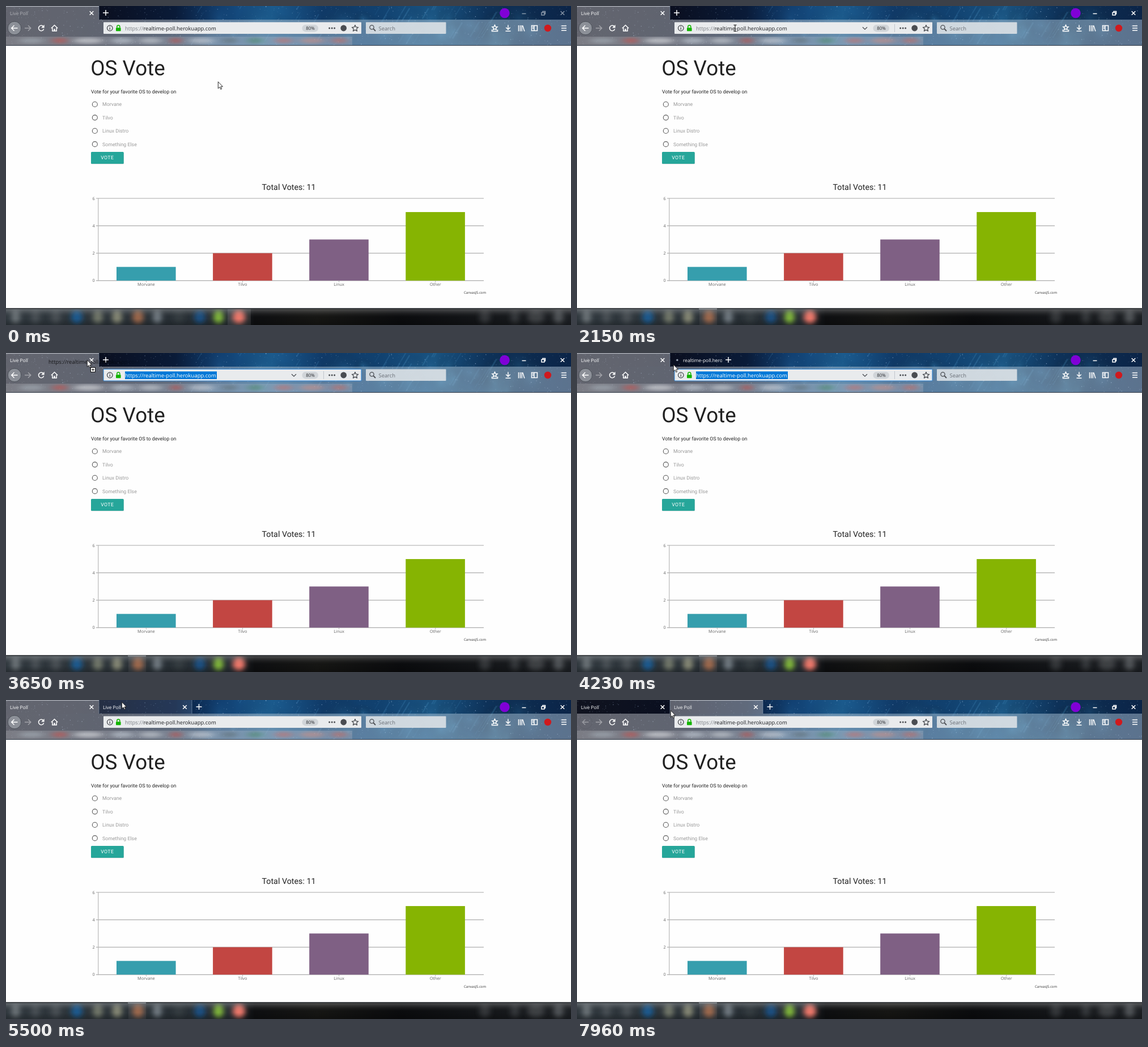
Write an HTML page with a canvas that moves like this. It is 997 px wide and 562 px high and loops after 8000 ms.

```html
<!DOCTYPE html>
<html lang="en">
<head>
<meta charset="utf-8">
<title>Live Poll</title>
<style>
html, body { margin: 0; width: 100%; height: 100%; overflow: hidden; background: #fefefe; }
canvas, svg { position: absolute; left: 0; top: 0; display: block; }
text { font-family: "Open Sans", sans-serif; text-rendering: geometricPrecision; white-space: pre; }
.page text { font-family: Roboto, sans-serif; font-size: 8.8px; }
.page .opt { fill: #9a9a9a; }
.chart text { font-family: "Open Sans", sans-serif; font-size: 7.4px; fill: #666; text-anchor: middle; }
.url { font-size: 9.5px; }
.tab { font-size: 8.4px; fill: #fff; }
.line { fill: none; stroke: #fff; stroke-width: 1.5; }
.dark { fill: none; stroke: #4a4d52; stroke-width: 1.3; }

/* one loop is 8 s, so 1% is 80 ms */
.sw { animation: 8s step-end infinite; }
.first { animation-name: first; }
.second { animation-name: second; }
.focus { animation-name: focus; }
.idle { animation-name: idle; }
.front { animation-name: front; }
.hoverbar { animation-name: hoverbar; }
.selected { animation-name: selected; }
.plain { animation-name: plain; }
.newtab { animation-name: newtab; }
.loading { animation-name: loading; }
.loaded { animation-name: loaded; }
.hovertab { animation-name: hovertab; }
.arrow { animation-name: arrow; }
.beam { animation-name: beam; }
.badge { animation-name: badge; }
.ghost { animation-name: ghost; }
@keyframes first { 0% { opacity: 1 } 92.25%, 100% { opacity: 0 } }
@keyframes second { 0% { opacity: 0 } 92.25%, 100% { opacity: 1 } }
@keyframes focus { 0% { opacity: .5 } 26.875%, 100% { opacity: 1 } }
@keyframes idle { 0% { opacity: 1 } 26.875%, 100% { opacity: 0 } }
@keyframes front { 0% { opacity: 0 } 26.875%, 100% { opacity: 1 } }
@keyframes hoverbar { 0% { opacity: 0 } 7% { opacity: 1 } 62.5%, 100% { opacity: 0 } }
@keyframes selected { 0% { opacity: 0 } 28% { opacity: 1 } 62.5%, 100% { opacity: 0 } }
@keyframes plain { 0% { opacity: 1 } 28% { opacity: 0 } 62.5%, 100% { opacity: 1 } }
@keyframes newtab { 0% { opacity: 0 } 51.875%, 100% { opacity: 1 } }
@keyframes loading { 0% { opacity: 1 } 63.75%, 100% { opacity: 0 } }
@keyframes loaded { 0% { opacity: 0 } 63.75%, 100% { opacity: 1 } }
@keyframes hovertab { 0% { opacity: 0 } 67.5% { opacity: 1 } 92.25%, 100% { opacity: 0 } }
@keyframes arrow { 0% { opacity: 1 } 7% { opacity: 0 } 37.5%, 100% { opacity: 1 } }
@keyframes beam { 0% { opacity: 0 } 7% { opacity: 1 } 37.5%, 100% { opacity: 0 } }
@keyframes badge { 0% { opacity: 0 } 37.5% { opacity: 1 } 51.875%, 100% { opacity: 0 } }
@keyframes ghost { 0% { opacity: 0 } 40.625% { opacity: 1 } 51.875%, 100% { opacity: 0 } }

.pointer { animation: move 8s linear infinite; }
@keyframes move {
  0%, 1.1% { transform: translate(374px, 133px); animation-timing-function: ease-in-out }
  5.75% { transform: translate(167px, 23px) }
  7% { transform: translate(200px, 32px); animation-timing-function: ease-out }
  10%, 13.4% { transform: translate(285.5px, 45px) }
  14.75% { transform: translate(275px, 51px) }
  15.75%, 18.3% { transform: translate(282px, 44px) }
  19.625%, 21.5% { transform: translate(281px, 41px) }
  22.2% { transform: translate(280px, 54px) }
  22.6% { transform: translate(279px, 37px) }
  23%, 26.875% { transform: translate(279px, 39px) }
  31.25%, 37% { transform: translate(276px, 39px) }
  39.375% { transform: translate(265.5px, 62px) }
  40% { transform: translate(262px, 64px) }
  45.625% { transform: translate(143px, 12px) }
  46.5% { transform: translate(135px, 8px) }
  48% { transform: translate(161px, 12px) }
  50%, 51.4% { transform: translate(176px, 12px); animation-timing-function: ease-in-out }
  61%, 62% { transform: translate(50px, 177px); animation-timing-function: ease-in-out }
  68.75% { transform: translate(204px, 3px) }
  72.5%, 78.2% { transform: translate(215px, 15.5px) }
  78.25%, 96.5% { transform: translate(248.5px, 17.5px) }
  99.5%, 100% { transform: translate(165px, 18px) }
}
.plus { animation: push 8s ease-out infinite; }
@keyframes push { 0%, 51.875% { transform: translate(176px, 12px) } 54.5%, 100% { transform: translate(340.5px, 12px) } }
.grow { animation: grow 8s ease-out infinite; }
@keyframes grow { 0%, 51.875% { width: 0 } 54.5%, 100% { width: 164.5px } }
.dot { animation: dot 1.2s ease-in-out infinite alternate; }
@keyframes dot { to { transform: translateX(4px) } }
</style>
</head>
<body>
<canvas id="sky" width="997" height="70"></canvas>
<svg width="997" height="562" viewBox="0 0 997 562">
  <defs>
    <filter id="soft" x="-20%" y="-60%" width="140%" height="220%"><feGaussianBlur stdDeviation="7 2.5"/></filter>
    <filter id="haze" x="-20%" y="-60%" width="140%" height="220%"><feGaussianBlur stdDeviation="5 4"/></filter>
    <linearGradient id="glass"><stop offset="0" stop-color="#bfc0c6" stop-opacity=".48"/><stop offset=".3" stop-color="#bcc4cc" stop-opacity=".48"/><stop offset=".6" stop-color="#b0cade" stop-opacity=".46"/><stop offset="1" stop-color="#b4c8da" stop-opacity=".48"/></linearGradient>
    <linearGradient id="bar"><stop offset="0" stop-color="#30383e"/><stop offset=".4" stop-color="#262d33"/><stop offset=".44" stop-color="#0e0f11"/><stop offset=".55" stop-color="#161614"/><stop offset=".7" stop-color="#0b0c0e"/><stop offset="1" stop-color="#1d2024"/></linearGradient>
    <linearGradient id="shade" x1="0" x2="0" y1="0" y2="1"><stop offset="0" stop-color="#fff" stop-opacity=".26"/><stop offset=".25" stop-color="#fff" stop-opacity=".1"/><stop offset=".6" stop-color="#000" stop-opacity="0"/><stop offset="1" stop-color="#000" stop-opacity=".2"/></linearGradient>
    <linearGradient id="fade" gradientUnits="userSpaceOnUse" x1="-68" x2="93" y1="0" y2="0"><stop offset="0" stop-opacity=".8"/><stop offset=".5" stop-opacity=".75"/><stop offset="1" stop-opacity=".1"/></linearGradient>
    <clipPath id="strip"><rect y="54" width="611" height="15"/></clipPath>
    <clipPath id="dock"><rect y="532" width="997" height="30"/></clipPath>
    <clipPath id="tabclip"><rect class="grow" x="164" y="0" width="164.5" height="25"/></clipPath>
    <path id="x" d="M-3.3-3.3 3.3 3.3M3.3-3.3-3.3 3.3"/>
  </defs>

  <!-- tabs -->
  <g class="sw first">
    <rect width="164" height="24" fill="#bfc0c6" fill-opacity=".48"/>
    <rect width="164" height="1.2" fill="#c9ccd2" fill-opacity=".8"/>
  </g>
  <g clip-path="url(#tabclip)"><g class="sw newtab">
    <g class="sw second">
      <rect x="164" width="164" height="24" fill="#bfc0c6" fill-opacity=".48"/>
      <rect x="164" width="164" height="1.2" fill="#c9ccd2" fill-opacity=".8"/>
    </g>
    <rect class="sw hovertab" x="164" width="164" height="24" fill="#8fb0d8" fill-opacity=".2"/>
    <path d="M328 0V24" stroke="#9fb4cc" stroke-opacity=".5"/>
    <g class="sw loading">
      <circle class="dot" cx="175" cy="12.5" r="1.7" fill="#9aa5b5"/>
      <text class="tab" x="187" y="16">realtime-poll.herokuapp.com/</text>
    </g>
    <text class="tab sw loaded" x="171" y="16">Live Poll</text>
    <use href="#x" class="line" x="315.5" y="12.5"/>
  </g></g>
  <path d="M164 0V24" stroke="#9fb4cc" stroke-opacity=".4"/>
  <text class="tab sw focus" x="7" y="16">Live Poll</text>
  <use href="#x" class="line" x="151" y="12.5"/>
  <path class="line plus" d="M-5 0H5M0-5V5"/>
  <circle cx="880" cy="12.5" r="8.7" fill="#8000d7"/>
  <g class="sw focus">
    <path class="line" d="M910.5 13.5H917.5"/>
    <path class="line" stroke-width="1" d="M945 11.5H950V16H945ZM947 11V9.5H951.5V14H950"/>
    <use href="#x" class="line" x="982" y="12.5"/>
  </g>

  <!-- toolbar -->
  <rect y="24" width="997" height="46" fill="url(#glass)"/>
  <g clip-path="url(#strip)">
    <rect y="54" width="611" height="15" fill="#d5d8dc" fill-opacity=".2"/>
    <g id="marks" filter="url(#soft)"></g>
  </g>
  <rect y="69" width="997" height="1" fill="#2c3542"/>
  <g class="sw first">
    <circle cx="15" cy="39" r="11.8" fill="#a9adb4" fill-opacity=".6" stroke="#4b5058" stroke-width="1"/>
    <path class="line" stroke-width="1.8" d="M20.5 39H10M14.5 34.2 9.7 39 14.5 43.8"/>
  </g>
  <g class="sw second" stroke-opacity=".35">
    <circle cx="15" cy="39" r="11.8" fill="none" stroke="#4b5058" stroke-width=".8"/>
    <path class="line" d="M20.5 39H10M14.5 34.2 9.7 39 14.5 43.8"/>
  </g>
  <path class="line" stroke-opacity=".4" d="M33 39H43.5M39 34.2 43.8 39 39 43.8"/>
  <path class="line" stroke-width="1.8" d="M66 36.2A4.7 4.7 0 1 0 66.7 40.5"/><path d="M67.6 33V38.4H62.2Z" fill="#fff"/>
  <path class="line" d="M79.8 39.3 85.5 33.8 91.2 39.3M81.8 38.5V44H89.2V38.5"/><path d="M84.3 40.3H86.7V44H84.3Z" fill="#fff"/>

  <rect x="172" y="28.5" width="455" height="20.5" rx="1" fill="#e9ebed"/>
  <rect class="sw selected" x="172" y="28.5" width="455" height="20.5" rx="1" fill="none" stroke="#2a84d8"/>
  <circle class="dark" stroke-width="1" cx="183.3" cy="39" r="4.8"/><path d="M183.3 38V42M183.3 35.8V37" stroke="#4a4d52" stroke-width="1.3"/>
  <rect x="194" y="38.2" width="8.6" height="6" rx=".8" fill="#12b400"/><path d="M195.8 38.5V36.6A2.5 2.5 0 0 1 200.8 36.6V38.5" fill="none" stroke="#12b400" stroke-width="1.5"/>
  <text class="url sw plain" x="210" y="42.6" fill="#202226"><tspan fill="#7b7f85">https://</tspan>realtime-poll.herokuapp.com</text>
  <g class="sw selected">
    <rect x="210" y="32.5" width="162" height="13.5" fill="#0078d7"/>
    <text class="url" x="210" y="42.6" fill="#fff">https://realtime-poll.herokuapp.com</text>
  </g>
  <g class="sw hoverbar">
    <path class="dark" stroke-width="1.6" d="M504 37.2 508 41.2 512 37.2"/>
    <path d="M560.5 32V46" stroke="#c3c7cc"/>
  </g>
  <rect x="522.5" y="33" width="28.5" height="12.4" rx="6.2" fill="#d1d5d9"/>
  <text x="537" y="42" font-size="7.9" text-anchor="middle" fill="#26282c">80%</text>
  <g fill="#4a4d52"><circle cx="570.7" cy="39" r="1.5"/><circle cx="575.2" cy="39" r="1.5"/><circle cx="579.7" cy="39" r="1.5"/><circle cx="595.7" cy="39" r="5.4"/></g>
  <path class="dark" stroke-linejoin="round" d="M616 33.6 617.6 37.2 621.6 37.6 618.6 40.2 619.5 44.1 616 42.1 612.5 44.1 613.4 40.2 610.4 37.6 614.4 37.2Z"/>

  <rect x="635" y="28.5" width="141.5" height="20.5" rx="1" fill="#e0e4e8" fill-opacity=".88"/>
  <g class="dark"><circle cx="645.5" cy="37.5" r="3.6"/><path stroke-width="1.8" d="M648.2 40.2 652 44"/></g>
  <text x="657.5" y="42.8" font-size="9.4" fill="#686d74">Search</text>

  <g class="line">
    <path d="M862.5 33.5 863.8 36.4 867 36.8 864.6 38.8 865.2 41.8 862.5 40.3 859.8 41.8 860.4 38.8 858 36.8 861.2 36.4ZM857.5 41.5V44.4H867.5V41.5"/>
    <path d="M886 33.5V41M882.3 37.8 886 41.5 889.7 37.8M881.5 44.3H890.5"/>
    <path d="M904.5 34V44.5M907.5 34V44.5M910.3 34V44.5M911.8 34.5 914.8 44.5"/>
    <path d="M927.5 34.5H937.5V43.5H927.5ZM932 34.5V43.5M929 37H931M929 39.5H931"/>
    <path d="M980 35H989M980 39H989M980 43H989"/>
  </g>
  <circle cx="956" cy="39" r="6.2" fill="#d0191d"/>

  <!-- page -->
  <rect y="70" width="997" height="463" fill="#fefefe"/>
  <g class="page" fill="#212121">
    <text x="149.3" y="121.5" style="font-size:36.8px">OS Vote</text>
    <text x="150" y="153.6">Vote for your favorite OS to develop on</text>
    <g id="options"></g>
    <rect x="150" y="258" width="58" height="20.5" rx="1.5" fill="#000" fill-opacity=".2"/>
    <rect x="150" y="257" width="57.7" height="21" rx="1.5" fill="#26a69a"/>
    <text x="167.2" y="270.2" fill="#fff" letter-spacing=".35">VOTE</text>
    <text x="499" y="324" text-anchor="middle" style="font-size:14.3px">Total Votes: 11</text>
    <g class="chart" id="chart"></g>
    <text x="808" y="506.8" style="font:6.1px 'Open Sans',sans-serif" fill="#333">CanvasJS.com</text>
  </g>

  <!-- taskbar -->
  <g clip-path="url(#dock)">
    <rect y="533" width="997" height="29" fill="url(#bar)"/>
    <rect class="sw idle" x="391" y="533" width="41" height="29" fill="#fff" fill-opacity=".1"/>
    <rect class="sw front" x="216" y="533" width="31" height="29" fill="#fff" fill-opacity=".06"/>
    <g id="apps" filter="url(#haze)"></g>
    <rect y="533" width="997" height="29" fill="url(#shade)"/>
    <rect y="532.3" width="997" height="1.4" fill="#15191d"/>
    <rect class="sw front" x="215" y="533" width="32" height="1.4" fill="#8b9196"/>
  </g>

  <!-- pointer -->
  <g class="pointer">
    <text class="url sw ghost" x="-68" y="6.5" fill="url(#fade)">https://realtime-poll.herokuapp.com</text>
    <path class="sw arrow" d="M.3.5V12.3L3 9.7 4.9 13.8 6.7 13 4.9 9H8.5Z" fill="#fff" stroke="#111" stroke-width=".9"/>
    <path class="sw beam" d="M-2.6-5.5H-.6L0-5 .6-5.5H2.6M0-5V5M-2.6 5.5H-.6L0 5 .6 5.5H2.6" fill="none" stroke="#111" stroke-width="1.1"/>
    <g class="sw badge">
      <rect x="6.5" y="13.5" width="8" height="8" fill="#fff" stroke="#111"/>
      <path d="M8.2 17.5H12.8M10.5 15.2V19.8" stroke="#111" stroke-width="1.1"/>
    </g>
  </g>
</svg>
<script>
const fill = (id, parts) => { document.getElementById(id).innerHTML = parts.join(""); };
const blob = (y, ry) => ([x, rx, color, alpha]) =>
  `<ellipse cx="${x}" cy="${y}" rx="${rx}" ry="${ry}" fill="${color}" fill-opacity="${alpha}"/>`;

fill("options", ["Morvane", "Tilvo", "Linux Distro", "Something Else"].map((name, i) => {
  const y = 173.2 + i * 23.4;
  return `<circle cx="156.8" cy="${y}" r="4.5" fill="none" stroke="#5a5a5a" stroke-width="1.1"/>
    <text class="opt" x="170" y="${y + 3.1}">${name}</text>`;
}));

const level = v => 483.8 - v * 24.15;
const grid = [0, 2, 4, 6].map(v =>
  `<path d="M159 ${level(v)}H843" stroke="#b9b9b9" stroke-width="1.4"/>
   <text x="154.5" y="${level(v) + 2.6}">${v}</text>`);
const bars = [["Morvane", 1, "#369ead"], ["Tilvo", 2, "#c24642"], ["Linux", 3, "#7f6084"], ["Other", 5, "#86b402"]]
  .map(([name, v, color], i) => {
    const x = 247.4 + i * 170.1;
    return `<rect x="${x - 52.4}" y="${level(v)}" width="104.6" height="${v * 24.15}" fill="${color}"/>
      <path d="M${x} 484V487" stroke="#b9b9b9"/><text x="${x}" y="493.2">${name}</text>`;
  });
fill("chart", [...grid, `<path d="M162.8 338.5V484.5" stroke="#b9b9b9" stroke-width="1.2"/>`, ...bars]);

fill("marks", [
  [45, 22, "#aab4bd", .5], [95, 13, "#c4544e", .6], [145, 26, "#d9dde0", .6], [205, 20, "#c9d2da", .55],
  [255, 20, "#c8cdd2", .6], [300, 10, "#c0504a", .6], [345, 22, "#c6ced5", .6], [395, 14, "#62737c", .6],
  [440, 14, "#4f8a72", .6], [490, 16, "#c2736e", .6], [540, 22, "#c98f88", .6], [588, 14, "#c26c66", .6]
].map(blob(61, 5)));

fill("apps", [
  [17, 8, "#858b90", .7], [52, 8, "#5a6166", .6], [88, 9, "#5a6166", .6], [125, 10, "#17629f", .85],
  [162, 9, "#8a8f7a", .75], [196, 9, "#a5a58a", .75], [233, 10, "#b0714f", .85], [267, 8, "#8b949c", .75],
  [305, 9, "#3a4248", .6], [342, 10, "#15568f", .85], [375, 9, "#86c03c", .95], [411, 11, "#f0796c", 1],
  [845, 10, "#4a4d50", .6], [898, 8, "#4a4d50", .6], [935, 15, "#55585b", .6], [975, 9, "#6d7073", .65]
].map(blob(548, 12)));

// starry wallpaper behind the window frame
const sky = document.getElementById("sky").getContext("2d");
let seed = 7;
const rnd = () => (seed = seed * 16807 % 2147483647) / 2147483647;
const base = sky.createLinearGradient(0, 0, 997, 0);
[[0, "#10131f"], [.17, "#0a0f20"], [.3, "#0a1b38"], [.38, "#114073"], [.47, "#1b5c90"], [.56, "#103a68"],
 [.66, "#11416f"], [.76, "#195483"], [.85, "#0e3259"], [1, "#0b2447"]].forEach(s => base.addColorStop(...s));
sky.fillStyle = base;
sky.fillRect(0, 0, 997, 70);
const cloud = (x, y, r, color) => {
  const g = sky.createRadialGradient(x, y, 0, x, y, r);
  g.addColorStop(0, color);
  g.addColorStop(1, "transparent");
  sky.fillStyle = g;
  sky.fillRect(x - r, y - r, 2 * r, 2 * r);
};
for (let i = 0; i < 60; i++) {
  cloud(330 + rnd() * 600, 20 + rnd() * 60, 12 + rnd() * 35, `rgba(70, 160, 210, ${.05 + rnd() * .16})`);
}
for (let i = 0; i < 45; i++) {
  const x = 320 + rnd() * 540, y = rnd() * 70, size = 8 + rnd() * 25;
  sky.strokeStyle = `rgba(90, 170, 220, ${.06 + rnd() * .14})`;
  sky.lineWidth = .8 + rnd() * 2;
  sky.beginPath();
  sky.moveTo(x, y);
  sky.lineTo(x + size * .6, y - size);
  sky.stroke();
}
for (let i = 0; i < 900; i++) {
  sky.fillStyle = `rgba(190, 215, 245, ${.1 + rnd() * rnd() * .6})`;
  const size = .6 + rnd() * .8;
  sky.fillRect(rnd() * 997, rnd() * 70, size, size);
}
</script>
</body>
</html>
```
